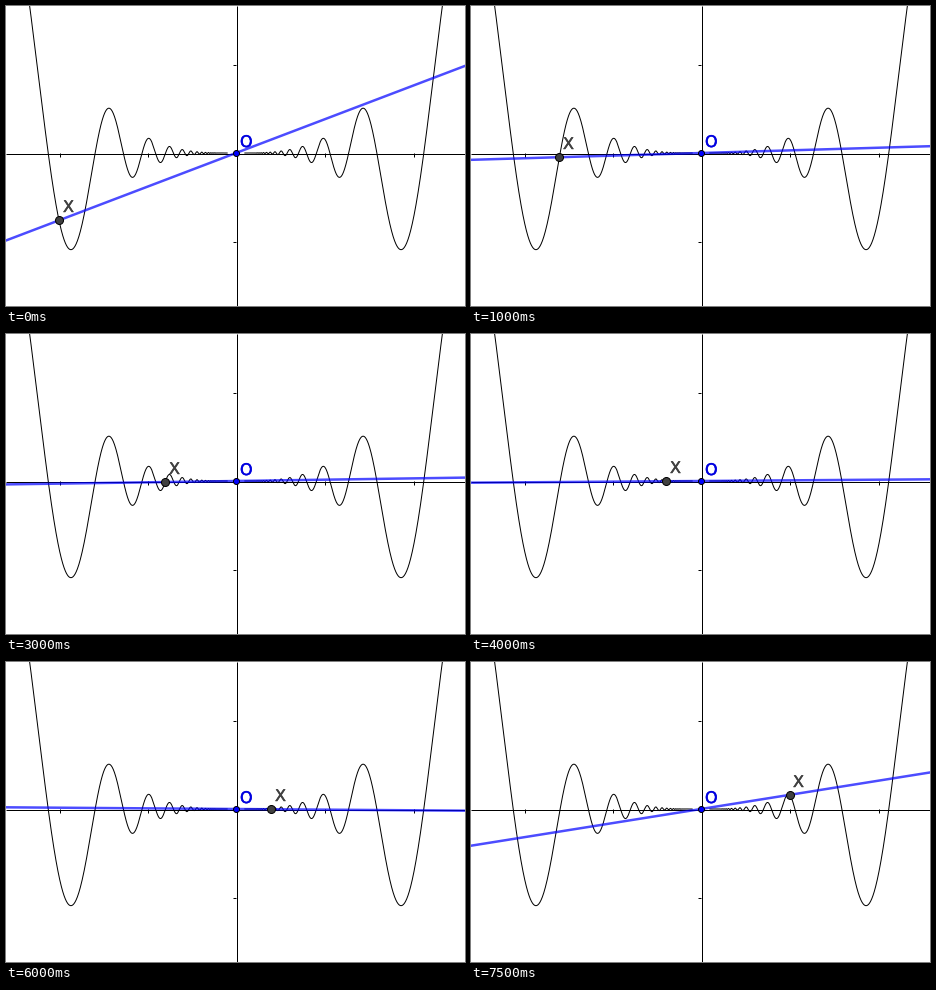
A matplotlib script that plays this animation: 459 px wide and 300 px high, repeating every 8000 ms.

```python
import numpy as np
import matplotlib.pyplot as plt
from matplotlib.animation import FuncAnimation
from matplotlib.patheffects import withStroke

W, H, DPI = 459, 300, 72        # at 72 dpi one point is one pixel
OX, OY = 230, 147               # origin on the stage
UNIT = 88.5                     # pixels per tick
FRAMES, INTERVAL = 16, 500
START, STEP = -2.0, 0.2
BLUE, GRAY = "#0000ff", "#404040"


def f(x):
    return 0.1748 * x**3 * np.sin(20 / x)


def to_stage(x, y):
    return OX + UNIT * x, OY - UNIT * y


fig = plt.figure(figsize=(W / DPI, H / DPI), dpi=DPI, facecolor="white")
ax = fig.add_axes([0, 0, 1, 1])
ax.set_xlim(0, W)
ax.set_ylim(H, 0)
ax.axis("off")


def crisp(v):
    """Centre of the pixel that holds v."""
    return np.floor(v) + 0.5


def segment(xs, ys):
    ax.plot(xs, ys, color="black", lw=1, solid_capstyle="butt",
            snap=True, zorder=1)


def dot(x, y, size, color, z):
    return ax.plot([x], [y], "o", ms=size, mfc=color, mec="black",
                   mew=1, snap=False, zorder=z)[0]


def label(x, y, text, color):
    return ax.text(x, y, text, color=color, fontsize=16, family="DejaVu Sans",
                   ha="left", va="baseline", zorder=6,
                   path_effects=[withStroke(linewidth=0.5, foreground=color)])


# Axes and ticks
segment([0, W], [crisp(OY)] * 2)
segment([crisp(OX)] * 2, [0, H])
for n in (-2, -1, 1, 2):
    segment([crisp(OX + n * UNIT)] * 2, [OY, OY + 4])
for n in (-1, 1):
    segment([OX - 3, OX], [crisp(OY + n * UNIT)] * 2)

# Even curve, drawn as two branches
u = np.linspace(0.1, 2.6, 4000)
for side in (-1, 1):
    ax.plot(*to_stage(side * u, f(u)), color="black", lw=1, snap=False,
            zorder=2)

secant, = ax.plot([], [], color=BLUE, alpha=0.7, lw=2.5, snap=False, zorder=3)
dot(OX, OY, 6, BLUE, 5)
label(OX + 4, OY - 6, "O", "#0000e0")
point = dot(OX, OY, 8, GRAY, 4)
name = label(OX, OY, "X", GRAY)
moving = (secant, point, name)


def update(k):
    x = round(START + STEP * k, 6)
    for artist in moving:
        artist.set_visible(x != 0)
    if x == 0:                  # no secant when both points coincide
        return moving
    y = f(x)
    px, py = to_stage(x, y)
    ends = np.array([0, W])
    secant.set_data(ends, OY - (ends - OX) * y / x)
    point.set_data([px], [py])
    name.set_position((round(px) + 4, round(py) - 8))
    return moving


anim = FuncAnimation(fig, update, frames=FRAMES, interval=INTERVAL,
                     init_func=lambda: update(0), repeat=True,
                     repeat_delay=0, blit=False)
plt.show()
```
